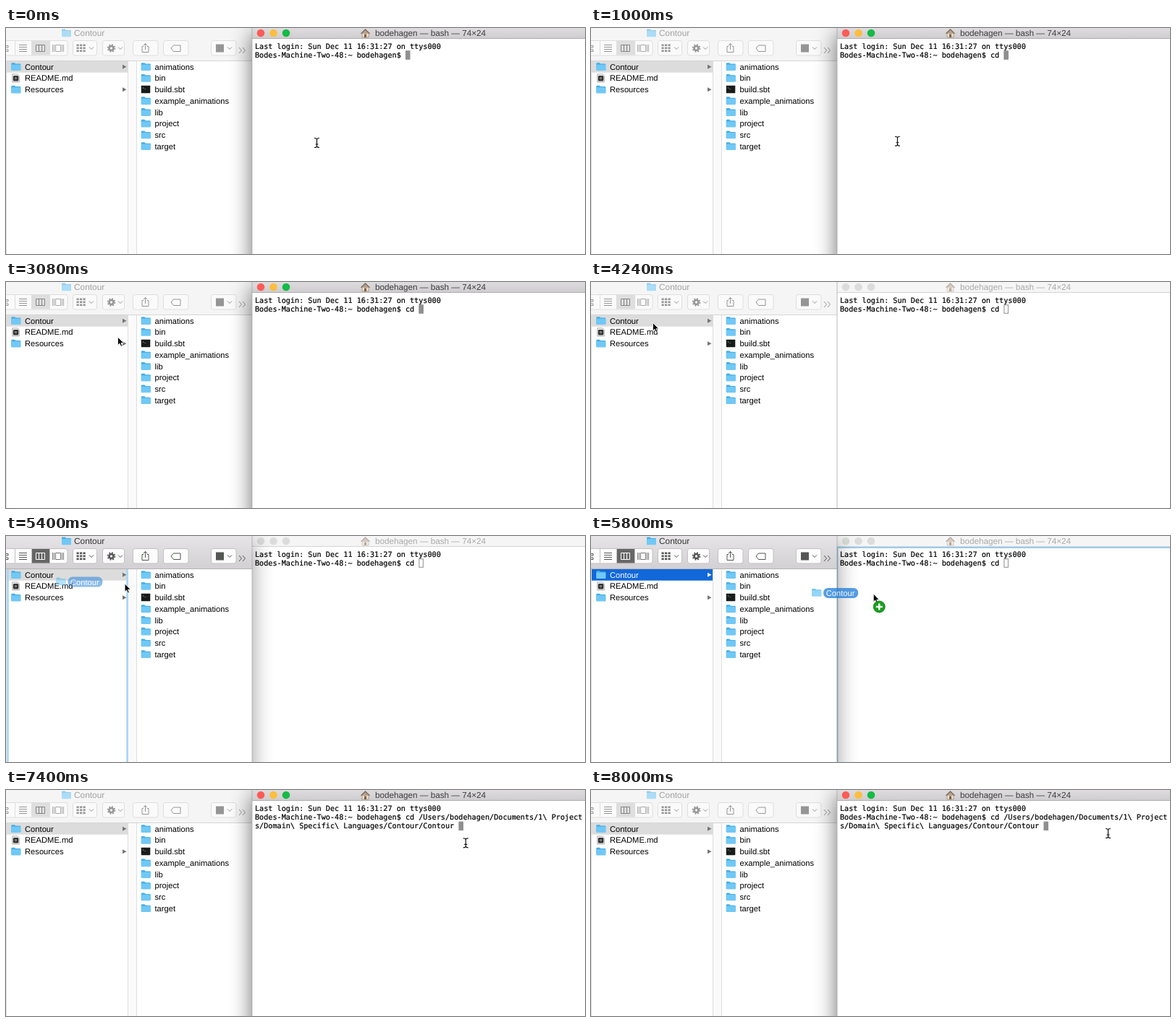
An HTML page for the animation above (8.04 s loop, 800 px wide and 313 px high).

```html
<!DOCTYPE html>
<html lang="en">
<head>
<meta charset="utf-8">
<title>Dragging a folder into a terminal</title>
<style>
html, body { margin: 0; width: 100%; height: 100%; overflow: hidden; background: #fff; }
svg { display: block; }
text { white-space: pre; font: 11.2px "Liberation Sans", Arial, sans-serif; text-rendering: geometricPrecision; }
.title { font-size: 11.9px; }
.mono text { font: 10.17px "DejaVu Sans Mono", monospace; stroke: #000; stroke-width: .2; }

#finder { --bar: #f6f5f6; --line: #d6d5d6; --ink: #a2a2a2; --icon: #959595; --edge: #dedede; --button: #fafafa; --on: #dedede; --onIcon: #858585; --row: #dcdcdc; --rowInk: #000; --arrow: #757575; --fade: .55; }
#finder.active { --bar: url(#chrome); --line: #b4b2b4; --ink: #333; --icon: #555; --edge: #c2c0c2; --button: #fcfcfc; --on: #666; --onIcon: #fff; --fade: 1; }
#finder.blue { --row: #1168d9; --rowInk: #fff; --arrow: #fff; }
#terminal { --bar: #f6f5f6; --line: #d6d5d6; --ink: #aaa; --red: #dcdcdc; --yellow: #dcdcdc; --green: #dcdcdc; --fade: .5; }
#terminal.active { --bar: url(#strip); --line: #b0aeb0; --ink: #3c3c3c; --red: #fc5b57; --yellow: #fdbd3f; --green: #14bb45; --fade: 1; }
.bar { fill: var(--bar); }
.line { fill: var(--line); }
.title { fill: var(--ink); }
.fade { opacity: var(--fade); }
.button { fill: var(--button); stroke: var(--edge); }
.icon { fill: none; stroke: var(--icon); }
.solid { fill: var(--icon); }
</style>
</head>
<body>
<svg width="800" height="313" viewBox="0 0 800 313">
  <defs>
    <linearGradient id="chrome" x2="0" y2="1"><stop stop-color="#e6e4e6"/><stop offset="1" stop-color="#d2d0d2"/></linearGradient>
    <linearGradient id="strip" x2="0" y2="1"><stop stop-color="#dedcde"/><stop offset="1" stop-color="#cfcdcf"/></linearGradient>
    <filter id="blur" filterUnits="userSpaceOnUse" x="-60" y="-60" width="920" height="520"><feGaussianBlur stdDeviation="15"/></filter>
    <clipPath id="leftHalf"><rect width="340" height="313"/></clipPath>
    <clipPath id="rightHalf"><rect x="340" width="460" height="313"/></clipPath>
    <g id="folder">
      <path d="M0 1.2Q0 0 1 0H4.6L6 1.4H12Q13 1.4 13 2.4V10H0Z" fill="#46afe6"/>
      <rect y="2.6" width="13" height="8.2" rx=".8" fill="#70c8f6"/>
    </g>
    <path id="chevron" d="M0 0L3 3L6 0"/>
  </defs>

  <g id="finder">
    <rect width="340" height="313" fill="#fff"/>
    <rect class="bar" width="340" height="45"/>
    <rect class="line" y="45" width="340" height="1"/>
    <use class="fade" href="#folder" x="77" y="1.5"/>
    <text class="title" x="94" y="11">Contour</text>

    <rect class="button" x="-10" y="17.5" width="95" height="20.5" rx="3"/>
    <rect x="35.5" y="18" width="25" height="19.5" fill="var(--on)"/>
    <path d="M12.5 18V37.5M35.5 18V37.5M60.5 18V37.5" stroke="var(--edge)"/>
    <path class="icon" d="M0 24.5H3V27H0M0 30H3V32.5H0M18 23.5H29M18 26.5H29M18 29.5H29M18 32.5H29"/>
    <path d="M41.5 23.5H53.5V32.5H41.500ZM45.500 23.500V32.500M49.500 23.500V32.500" fill="none" stroke="var(--onIcon)"/>
    <path class="icon" stroke-width=".8" d="M68.500 23.500H75.500V32.500H68.500ZM64.500 23V33M66.500 23V33M77.500 23V33M79.500 23V33"/>

    <g id="buttons"></g>
    <g id="grid" class="solid"></g>
    <g class="icon">
      <use href="#chevron" x="115" y="26.5"/><use href="#chevron" x="155" y="26.5"/><use href="#chevron" x="306" y="26.5"/>
      <circle cx="145.5" cy="28" r="3" stroke-width="2.6"/>
      <circle cx="145.5" cy="28" r="5" stroke-width="1.6" stroke-dasharray="1.960"/>
      <path d="M190 25.500H188V33.500H197V25.500H195M192.500 30V21.500M190 24L192.500 21.500L195 24"/>
      <path d="M228 28L231.500 24H241V32.500H231.500Z"/>
      <path d="M322 27L325.500 31L322 35M327 27L330.500 31L327 35"/>
    </g>
    <rect class="solid" x="290" y="22.500" width="11" height="11"/>

    <rect x="168" y="46" width="13" height="267" fill="#fafafa"/>
    <path d="M.5 46V313M168.500 46V313M180.500 46V313" stroke="#dedede"/>
    <rect x="1" y="46" width="167" height="15.700" fill="var(--row)"/>
    <g id="rows"></g>
    <path id="column" d="M2.500 46V313M167.500 46V313" stroke="#a6d5f5" stroke-width="2.500"/>
  </g>

  <g id="terminal">
    <rect x="340" width="460" height="313" fill="#fff"/>
    <rect class="bar" x="340" width="460" height="14"/>
    <rect class="line" x="340" y="14" width="460" height="1"/>
    <circle cx="352" cy="7" r="5.300" fill="var(--red)"/>
    <circle cx="369.500" cy="7" r="5.300" fill="var(--yellow)"/>
    <circle cx="387" cy="7" r="5.300" fill="var(--green)"/>
    <g class="fade">
      <path d="M492 7H501V13H492Z" fill="#e6dfd4" stroke="#96897a" stroke-width=".7"/>
      <path d="M490.500 7.800L496.500 2L502.500 7.800" fill="#b7a18c" stroke="#7c6b5c" stroke-width="1.300"/>
      <rect x="495" y="8.500" width="3" height="4.500" fill="#8a5e35"/>
    </g>
    <text class="title" x="510" y="11" style="font-size:11.700px">bodehagen — bash — 74×24</text>
    <g class="mono">
      <text x="344" y="28.800">Last login: Sun Dec 11 16:31:27 on ttys000</text>
      <text id="line1" x="344" y="41.100"></text>
      <text id="line2" x="344" y="53.400"></text>
    </g>
    <rect id="caret" width="5.500" height="11.500"/>
    <path id="dropEdge" d="M800 16H340.500V313" fill="none" stroke="#78bce8" stroke-width="1.500"/>
  </g>
  <g id="leftShade" clip-path="url(#leftHalf)">
    <rect x="340" y="8" width="480" height="400" opacity=".58" filter="url(#blur)"/>
  </g>
  <g id="rightShade" clip-path="url(#rightHalf)">
    <rect x="-20" y="8" width="360" height="400" opacity=".4" filter="url(#blur)"/>
  </g>
  <path d="M340 0V313" stroke="#aaa" stroke-width=".8"/>

  <g id="ghost">
    <use href="#folder" x="-16" y="-6"/>
    <rect y="-7" width="48" height="14" rx="6.500" fill="#1a7bdb"/>
    <text x="3.500" y="4" fill="#fff">Contour</text>
  </g>
  <g id="pointer">
    <path id="beam" d="M-3 -6.500Q.5 -6.500 .5 -4.500Q.5 -6.500 4 -6.500M.5 -4.500V4.500M-3 6.500Q.5 6.500 .5 4.500Q.5 6.500 4 6.500M-1.500 2H2.500" fill="none" stroke="#111" stroke-width="1.200"/>
    <path id="arrow" d="M0 0V11.200L2.500 8.900L4.300 13L6.200 12.200L4.500 8.200H8Z" fill="#000" stroke="#fff" stroke-width=".8"/>
    <g id="badge">
      <circle cx="8" cy="18" r="8" fill="#17a020" stroke="#0d7916" stroke-width=".8"/>
      <path d="M3.500 18H12.500M8 13.500V22.500" stroke="#fff" stroke-width="2.400"/>
    </g>
  </g>
</svg>
<script>
const $ = id => document.getElementById(id);
const LOOP = 8040, CELL = 6.12, COLUMNS = 74;
const PROMPT = "Bodes-Machine-Two-48:~ bodehagen$ ";
const PATH = "/Users/bodehagen/Documents/1\\ Projects/Domain\\ Specific\\ Languages/Contour/Contour ";
const KEYS = [360, 520, 680];
const GRAB = 5200, DROP = 6880, REFOCUS = 7240;

// [time, x, y]
const MOUSE = [
  [0, 429, 159], [900, 429, 159], [1300, 405, 150], [1700, 362, 135], [1960, 356, 132],
  [2500, 330, 122], [2900, 190, 86], [3400, 92, 59], [3800, 85.5, 56.5], [GRAB, 85.5, 56.5],
  [5290, 110, 60], [5400, 163.5, 66], [5520, 240, 71], [5680, 345, 77], [5740, 380, 79.5],
  [5800, 390, 80], [6200, 490, 81], [6600, 564, 82], [DROP, 572, 82], [REFOCUS, 590, 80],
  [7600, 690, 65], [8000, 714, 60]
];
// [time, opacity]
const GHOST = [[GRAB, .3], [5400, .5], [5800, .74], [6400, 1]];

function along(keys, t) {
  const i = keys.findIndex(k => k[0] > t);
  if (i < 0) return keys.at(-1).slice(1);
  if (i === 0) return keys[0].slice(1);
  const a = keys[i - 1], b = keys[i], p = (t - a[0]) / (b[0] - a[0]);
  return a.slice(1).map((v, j) => v + (b[j + 1] - v) * p);
}

const show = (id, on) => $(id).style.display = on ? "" : "none";
const move = (id, x, y) => $(id).setAttribute("transform", `translate(${x} ${y})`);

function iconAt(name, x, y) {
  if (name === "README.md") return `<path d="M${x + 1.5} ${y - 5.5}h7l2.5 2.5v8.5h-9.5z" fill="#f4f4f4" stroke="#999" stroke-width=".8"/>
    <rect x="${x + 2.5}" y="${y - 3.5}" width="7.5" height="7.5" rx="1.5" fill="#333"/>
    <circle cx="${x + 6.2}" cy="${y + .2}" r="1.8" fill="#777"/>`;
  if (name === "build.sbt") return `<rect x="${x}" y="${y - 5.5}" width="12.5" height="10.5" rx=".6" fill="#171b1a"/>
    <path d="M${x + 2} ${y - 3}l1.5 1l-1.5 1M${x + 4.5} ${y - .5}h2" fill="none" stroke="#7d9183" stroke-width=".7"/>`;
  return `<use href="#folder" x="${x}" y="${y - 5.5}"/>`;
}

function column(names, x, expands) {
  return names.map((name, i) => {
    const y = 53.7 + i * 15.72, first = expands && i === 0;
    const triangle = expands && i !== 1
      ? `<path d="M161 ${y - 3}L166.5 ${y}L161 ${y + 3}Z" fill="${first ? "var(--arrow)" : "#757575"}"/>` : "";
    return iconAt(name, x, y) + triangle +
      `<text x="${x + 18.7}" y="${y + 4}" fill="${first ? "var(--rowInk)" : "#000"}">${name}</text>`;
  }).join("");
}

$("rows").innerHTML = column(["Contour", "README.md", "Resources"], 7.3, true) +
  column(["animations", "bin", "build.sbt", "example_animations", "lib", "project", "src", "target"], 186.8, false);
$("buttons").innerHTML = [[92.5, 33], [133.5, 30], [175.5, 34.5], [217.5, 34.5], [283.5, 34.5]]
  .map(([x, w]) => `<rect class="button" x="${x}" y="17.5" width="${w}" height="20.5" rx="3"/>`).join("");
$("grid").innerHTML = Array.from({ length: 9 }, (_, i) =>
  `<rect x="${97.5 + i % 3 * 4.5}" y="${22.5 + Math.floor(i / 3) * 4}" width="3.2" height="2.6"/>`).join("");

function draw(t) {
  const terminalOn = t < 4160 || t >= REFOCUS;
  const finderOn = t >= 4280 && t < REFOCUS;
  const dragging = t >= GRAB && t < DROP;
  const inColumn = t >= 5240 && t < 5460;
  const [x, y] = along(MOUSE, t);
  const overTerminal = x > 340;

  $("finder").setAttribute("class", finderOn ? inColumn ? "active" : "active blue" : "");
  $("terminal").setAttribute("class", terminalOn ? "active" : "");
  show("leftShade", terminalOn);
  show("rightShade", finderOn);
  show("column", inColumn);
  show("dropEdge", dragging && overTerminal);

  const typed = "cd ".slice(0, KEYS.filter(k => t >= k).length);
  const line = PROMPT + typed + (t >= DROP ? PATH : "");
  $("line1").textContent = line.slice(0, COLUMNS);
  $("line2").textContent = line.slice(COLUMNS);
  const row = Math.floor(line.length / COLUMNS);
  move("caret", 344.4 + line.length % COLUMNS * CELL, 31.8 + row * 12.3);
  $("caret").setAttribute("fill", terminalOn ? "#8f8f8f" : "#fff");
  $("caret").setAttribute("stroke", "#8f8f8f");

  show("ghost", dragging);
  const [gx, gy] = along(MOUSE, t - 30);
  move("ghost", gx - 64, gy - .8);
  $("ghost").setAttribute("opacity", along(GHOST, t)[0]);

  const beam = overTerminal && (t < GRAB || t >= REFOCUS);
  move("pointer", x, y);
  show("beam", beam);
  show("arrow", !beam);
  show("badge", dragging && overTerminal);
}

const start = performance.now();
function tick() {
  draw((performance.now() - start) % LOOP);
  requestAnimationFrame(tick);
}
tick();
</script>
</body>
</html>
```
